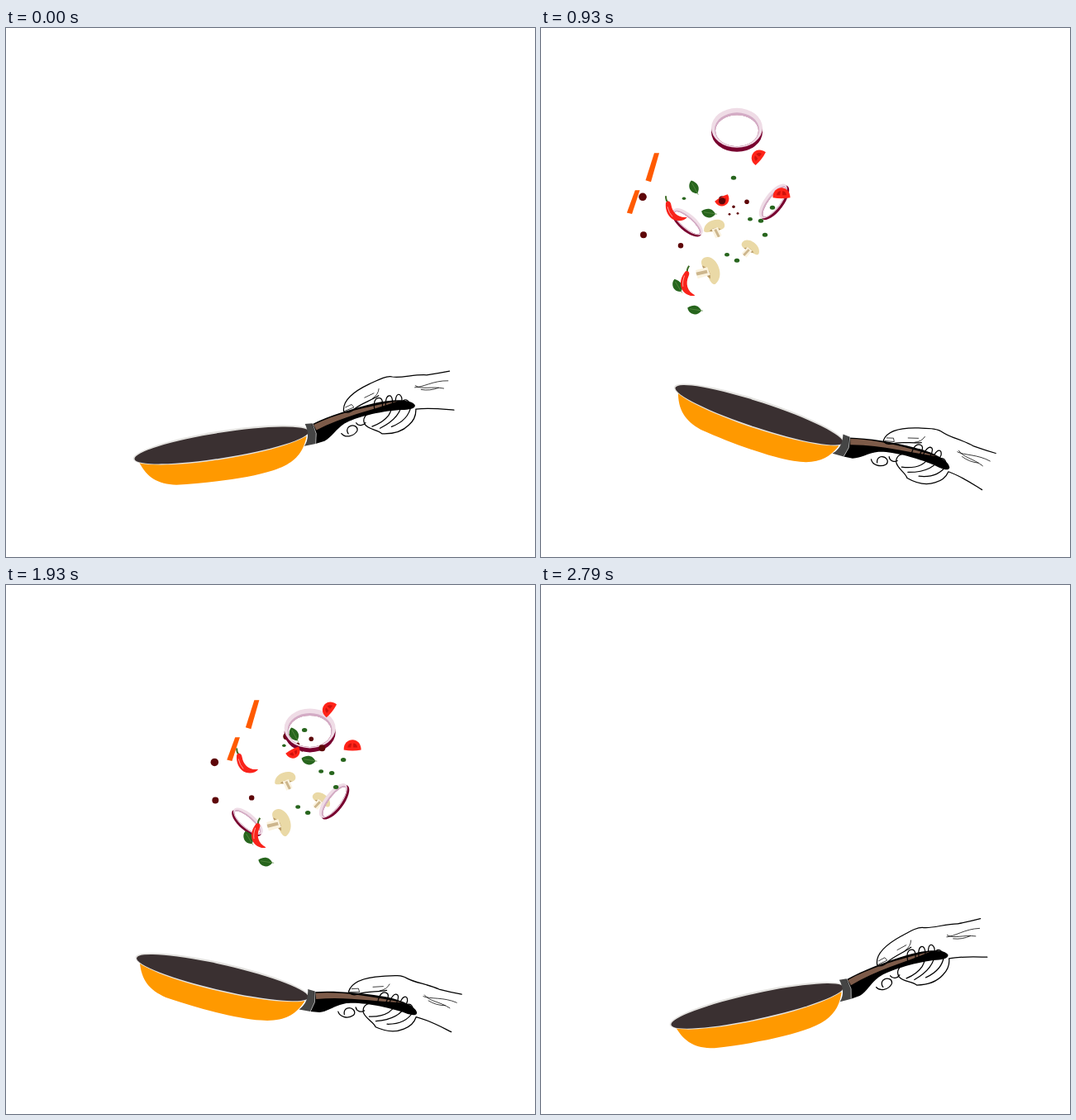
Write an HTML page that moves like this. It is 640x640 px and loops after 3.14 s.

```html
<!DOCTYPE html>
<html lang="en">
<head>
<meta charset="utf-8">
<title>Tossing vegetables</title>
<style>
  html, body { margin: 0; width: 100%; height: 100%; overflow: hidden; background: #fff; }
  svg { display: block; width: 100%; height: 100%; }
  .line { fill: none; stroke: #000; stroke-width: 1.25; stroke-linecap: round; stroke-linejoin: round; }
  .fine { stroke-width: .7; }
</style>
</head>
<body>
<svg viewBox="0 0 640 640">
  <defs>
    <clipPath id="aboveRim">
      <path id="rimClip" d="M-400-900H1000V495H368C300 476 200 476 152 486H-400Z"/>
    </clipPath>

    <g id="carrot"><path fill="#ff5a00" d="M3-17 9-17-1 18-7.5 16Z"/></g>

    <g id="tomato">
      <path fill="#ff2419" d="M-10.5 5C-11-10 10-12 10.5 5Q0 7-10.5 5Z"/>
      <path fill="#cf120c" d="M-6 2Q-5-3-1-3L-2 2ZM1 2 1-3Q5-3 6 2Z"/>
    </g>

    <g id="mushroom">
      <path fill="#ead9a6" d="M-14 3C-13-11 11-14 13-3C14 4 5 4 0 4C-6 5-13 7-14 3Z"/>
      <path fill="#b99a66" d="M-7 4Q0-2 8 3L3 5H-4Z"/>
      <path fill="#fbf3df" d="M-4 2 4 0 8 11 0 14Z"/>
      <path fill="#cdb68d" d="M-1 3 2 2 6 12 3 13Z"/>
    </g>

    <g id="chili">
      <path fill="none" stroke="#3c6b23" stroke-width="2" d="M-10-8Q-13-10-13-16"/>
      <path fill="#f9231b" d="M-13-8C-11-11-7-10-6.5-5C-5 4 2 11 13 9.5C9 15 0 15-5 12C-11 8-14 0-13-8Z"/>
      <path fill="none" stroke="#ff9a90" d="M-11-3Q-9 5-5 9"/>
    </g>

    <g id="leaf">
      <path fill="#27651d" d="M8 0C4-7-3-7-9-2C-7 6 4 8 8 0Z"/>
      <path fill="none" stroke="#5b8f45" stroke-width=".7" d="M-6-1 10 0"/>
    </g>

    <g id="herb"><ellipse rx="3.2" ry="2.5" fill="#27651d"/></g>
    <g id="berry"><circle r="4" fill="#5e0709"/></g>

    <g id="ring" fill-rule="evenodd"></g>
    <g id="slice" fill-rule="evenodd"></g>
  </defs>

  <g id="pan">
    <path fill="#ff9900" d="M158 489C164 510 175 520 197 525.5C235 531 285 535 315 531.5C346 528 356 515 363 499Z"/>
    <g transform="translate(260 489) rotate(2.4)">
      <ellipse rx="108.3" ry="17.2" fill="#e3e2df"/>
      <ellipse cy=".4" rx="106.6" ry="15.3" fill="#3a3031"/>
    </g>
    <path fill="#454545" d="M364 484 373 485 375 498 372 510 358 510Q368 500 364 484Z"/>
    <path d="M372 486C395 480 425 477 452 476C478 475 497 481 499 488C499 493 489 492 480 490C455 487 425 488 411 493C399 498 393 506 383 509L372 510 375 498Z"/>
    <path fill="#7d5b49" d="M374 487C400 480 435 478 480 479C445 484 410 484 376 494Z"/>
    <path fill="none" stroke="#bbb" stroke-width=".8" d="M373 485 375 498 372 510"/>
    <path class="line" d="M413 478C414 466 426 458 450 452C462 449 472 446 479 449C490 453 505 451 520 455Q535 456 548 456
      M413 478C416 482 422 481 426 478C436 473 448 472 458 468
      M544 503C530 499 515 494 499 493C498 500 494 506 487 510C478 516 465 517 453 514C449 508 438 506 435 499C432 490 440 487 447 484
      M450 484C450 475 453 470 458 471C463 472 461 479 459 485
      M464 483C465 474 468 469 472 471C475 474 473 486 465 494Q457 501 443 503
      M477 478C479 470 484 469 485 476C484 490 474 501 452 507
      M486 480C490 478 494 482 494 488C489 501 478 506 466 508
      M405 504C408 510 418 511 424 505C427 500 421 495 415 498Q411 501 413 506
      M425 495C427 500 433 500 436 497"/>
    <path class="line fine" d="M416 474 424 472 426 476 415 478M450 470Q458 467 460 460M441 467 453 464
      M503 467C512 469 527 463 544 467M504 465C512 472 522 469 537 475M510 471Q520 475 531 473"/>
  </g>
  <g clip-path="url(#aboveRim)"><g id="food"></g></g>
</svg>

<script>
const FRAME = 71.5, LAST = 39, LOOP = 3140;
const get = id => document.getElementById(id);

// Onion rings: skin, flesh and inner shade share one see-through hole
const oval = (cy, rx, ry) => `M${-rx} ${cy}a${rx} ${ry} 0 1 0 ${2 * rx} 0a${rx} ${ry} 0 1 0 ${-2 * rx} 0Z`;
function onion(rx, ry, lift, band) {
  const hole = oval(lift * .4, rx - band, ry - band);
  return [['#78002f', oval(lift, rx, ry)], ['#efdce6', oval(-lift, rx, ry)],
    ['#d3abc5', oval(-lift * .2, rx - band + 1, ry - band + lift * .6)]]
    .map(([fill, d]) => `<path fill="${fill}" d="${d + hole}"/>`).join('');
}
get('ring').innerHTML = onion(31, 24, 2.5, 5);
get('slice').innerHTML = onion(25, 10, 1.5, 3.2);

const panTimes = [0, 320, 500, 930, 1210, 1640, 1720, 2210, 2790];
const panAngles = [-11.4, -18.5, -16.3, 15.8, 18, 19, 18.6, 0, -14.8];

// Flight of each kind of ingredient, relative to its place near the top
const foodTimes = [400, 500, 930, 1210, 1640, 2210, 2640];
const flights = {
  mid:   { x: [24, 20, -41, 0, 66, 88, 15], y: [520, 413, 84, 0, 22, 174, 490] },
  wide:  { x: [18, 13, -57, 0, 91, 97, 15], y: [520, 423, 98, 0, 4, 206, 500] },
  big:   { x: [10, 7, -43, 0, 70, 85, 15],  y: [550, 453, 70, 0, 45, 232, 520] },
  heavy: { x: [10, 7, -37, 0, 57, 81, 15],  y: [550, 453, 70, 0, 43, 232, 520] },
  low:   { x: [24, 20, -41, 0, 66, 90, 15], y: [520, 413, 80, 0, 30, 187, 490] },
  spice: { x: [24, 20, -40, 0, 61, 81, 15], y: [520, 413, 90, 0, 15, 160, 490] }
};

// shape, flight, x, y, angle, scale
const items = [
  ['berry', 'low', 164, 124, 0, 1.2],
  ['berry', 'low', 165, 170],
  ['berry', 'mid', 210, 179, 0, .8],
  ['berry', 'spice', 259, 117],
  ['berry', 'spice', 289, 120, 0, .7],
  ['berry', 'spice', 273, 126, 0, .45],
  ['berry', 'spice', 268, 135, 0, .35],
  ['berry', 'spice', 278, 134, 0, .35],
  ['mushroom', 'mid', 251, 157, -5, .95],
  ['mushroom', 'mid', 294, 182, 22, '-.88 .88'],
  ['mushroom', 'mid', 245, 209, 55, '-1.25 1.25'],
  ['ring', 'big', 280, 53],
  ['slice', 'heavy', 319, 140, -53],
  ['slice', 'heavy', 214, 165, 41, .9],
  ['carrot', 'wide', 191, 70],
  ['carrot', 'wide', 168, 112, 0, '.95 .82'],
  ['tomato', 'mid', 332, 116],
  ['tomato', 'mid', 303, 71, -52, .95],
  ['tomato', 'mid', 261, 125, 152, .85],
  ['berry', 'wide', 276, 111],
  ['herb', 'wide', 230, 108, 0, .7],
  ['herb', 'mid', 274, 97],
  ['herb', 'mid', 294, 147, 0, .9],
  ['herb', 'mid', 307, 149],
  ['herb', 'mid', 321, 133],
  ['herb', 'mid', 312, 166],
  ['herb', 'mid', 266, 190, 0, .9],
  ['herb', 'mid', 278, 197],
  ['leaf', 'wide', 242, 95, 58],
  ['leaf', 'wide', 260, 126, 5],
  ['leaf', 'mid', 206, 228, 55],
  ['leaf', 'mid', 227, 257, 5],
  ['chili', 'mid', 205, 135],
  ['chili', 'mid', 222, 224, 34]
];

const groups = {};
get('food').innerHTML = items.map(([shape, flight, x, y, angle = 0, scale = 1]) =>
  `<g class="${flight}"><use href="#${shape}" transform="translate(${x} ${y}) rotate(${angle}) scale(${scale})"/></g>`
).join('');
for (const name in flights) groups[name] = document.querySelectorAll('#food .' + name);

// Smooth curve through the given values
function curve(times, values, t) {
  const end = times.length - 1;
  if (t <= times[0]) return values[0];
  if (t >= times[end]) return values[end];
  const i = times.findIndex(time => time > t) - 1;
  const slope = k => {
    const a = Math.max(k - 1, 0), b = Math.min(k + 1, end);
    return (values[b] - values[a]) / (times[b] - times[a]);
  };
  const span = times[i + 1] - times[i], u = (t - times[i]) / span, v = 1 - u;
  return values[i] * v * v * (1 + 2 * u) + values[i + 1] * u * u * (1 + 2 * v)
    + span * u * v * (slope(i) * v - slope(i + 1) * u);
}

function draw(now) {
  const t = Math.min(LAST, Math.floor((now % LOOP + 6) / FRAME)) * FRAME;
  const turn = `rotate(${curve(panTimes, panAngles, t)} 338 493)`;
  get('pan').setAttribute('transform', turn);
  get('rimClip').setAttribute('transform', turn);
  for (const name in flights) {
    const { x, y } = flights[name];
    const move = `translate(${curve(foodTimes, x, t)} ${curve(foodTimes, y, t)})`;
    groups[name].forEach(item => item.setAttribute('transform', move));
  }
  requestAnimationFrame(draw);
}
draw(performance.now());
</script>
</body>
</html>
```
